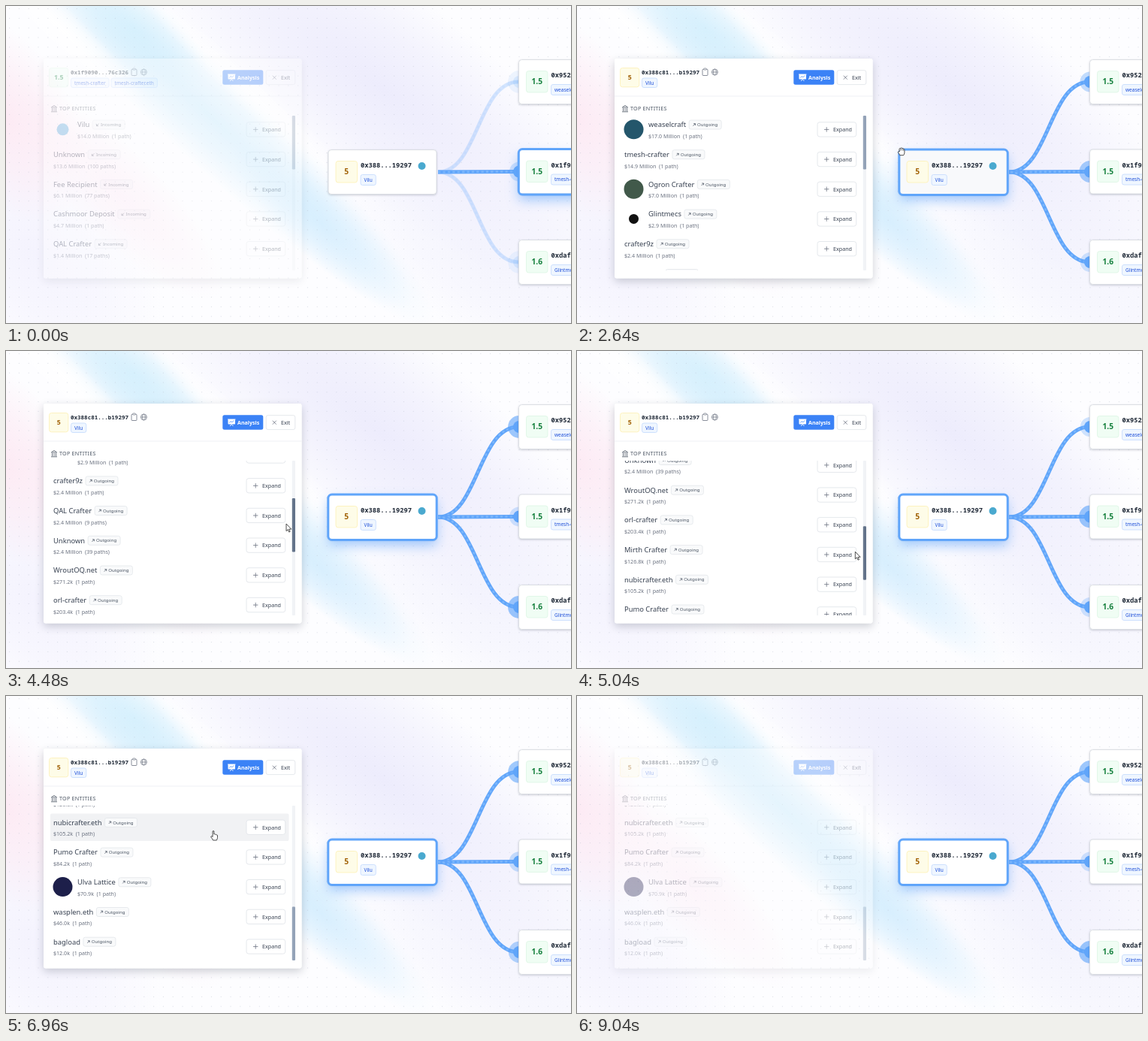
An HTML page with a canvas for the animation above (9120 ms loop, 752 by 422 pixels).

```html
<!DOCTYPE html>
<html lang="en">
<head>
<meta charset="utf-8">
<title>Entity paths</title>
<style>
html, body { margin: 0; width: 100%; height: 100%; overflow: hidden; background: #fff; }
canvas { display: block; width: 752px; height: 422px; }
</style>
</head>
<body>
<canvas id="stage"></canvas>
<script>
const W = 752, H = 422, LOOP = 9120;
const SANS = '"Noto Sans", "Open Sans", sans-serif';
const MONO = '"Noto Sans Mono", "DejaVu Sans Mono", monospace';
const BLUE = '#60a5fa';
const SELECT = 1400, ROWS_IN = 1475, STAGGER = 100, ROW_TIME = 300;
const DRAG_FROM = 3760, DRAG_TO = 5800;
const PITCH = 39.7, LIST_TOP = 146, LIST_H = 206, MAX_SCROLL = 386.6, THUMB = 71.5;

const dpr = window.devicePixelRatio || 1;
const clamp = (v, a = 0, b = 1) => Math.min(b, Math.max(a, v));
const mix = (a, b, p) => a + (b - a) * p;

function layer(el = document.createElement('canvas')) {
  el.width = W * dpr;
  el.height = H * dpr;
  const c = el.getContext('2d');
  c.scale(dpr, dpr);
  return c;
}
const screen = layer(document.getElementById('stage'));
const backdrop = layer(), panel = layer();
let g = screen;

// ---- drawing helpers ----
function text(s, x, cy, size, color, weight = 400, font = SANS) {
  g.font = `${weight} ${size}px ${font}`;
  g.fillStyle = color;
  g.fillText(s, x, cy + size * 0.36);
  return g.measureText(s).width;
}
function centred(s, x, cy, size, color, weight) {
  g.textAlign = 'center';
  text(s, x, cy, size, color, weight);
  g.textAlign = 'left';
}
function box(x, y, w, h, r, fill, stroke, line = 0.8) {
  g.beginPath();
  g.roundRect(x, y, w, h, r);
  if (fill) { g.fillStyle = fill; g.fill(); }
  if (stroke) { g.strokeStyle = stroke; g.lineWidth = line; g.stroke(); }
}
function shadowBox(x, y, w, h, r, color, blur, dy) {
  g.save();
  g.shadowColor = color;
  g.shadowBlur = blur * dpr;
  g.shadowOffsetY = dy * dpr;
  box(x, y, w, h, r, '#fff');
  g.restore();
}
function disc(x, y, r, color) {
  g.beginPath();
  g.arc(x, y, r, 0, Math.PI * 2);
  g.fillStyle = color;
  g.fill();
}
function lines(d, color, width = 0.8) {
  g.strokeStyle = color;
  g.lineWidth = width;
  g.stroke(new Path2D(d));
}
function blueTag(s, x, y, h = 12.5) {
  g.font = `500 6.5px ${SANS}`;
  const w = g.measureText(s).width + 9;
  box(x, y, w, h, 2.5, '#eff6ff', '#c3dafe');
  text(s, x + 4.5, y + h / 2, 6.5, '#1d4ed8', 500);
  return w;
}
function score(s, x, y, size, fontSize) {
  const amber = s === '5';
  box(x, y, size, size, 3, amber ? '#fefce8' : '#f0fdf4', amber ? '#fdf0b4' : '#dcf5e4');
  centred(s, x + size / 2, y + size / 2, fontSize, amber ? '#a16207' : '#15803d', 600);
}

// ---- backdrop ----
function glow(x, y, deg, len, wide, rgb, a) {
  g.save();
  g.translate(x, y);
  g.rotate(deg * Math.PI / 180);
  g.scale(len, wide);
  const f = g.createRadialGradient(0, 0, 0, 0, 0, 1);
  f.addColorStop(0, `rgba(${rgb},${a})`);
  f.addColorStop(0.5, `rgba(${rgb},${a * 0.6})`);
  f.addColorStop(1, `rgba(${rgb},0)`);
  g.fillStyle = f;
  g.fillRect(-1, -1, 2, 2);
  g.restore();
}
function paintBackdrop() {
  g = backdrop;
  g.fillStyle = '#fdfdff';
  g.fillRect(0, 0, W, H);
  glow(500, 110, 38, 430, 130, '224,222,250', 0.55);
  glow(640, 340, 35, 260, 100, '236,236,252', 0.5);
  glow(40, 330, 45, 200, 130, '238,236,253', 0.6);
  glow(0, 150, 60, 150, 90, '252,224,238', 0.65);
  glow(150, 250, 45, 190, 60, '250,228,242', 0.5);
  glow(275, 150, 43, 400, 62, '190,230,252', 0.6);
  glow(170, 30, 38, 120, 50, '200,236,252', 0.5);
  glow(420, 290, 43, 160, 45, '195,230,254', 0.4);
  glow(75, 30, 43, 150, 26, '255,255,255', 0.9);
  glow(330, 120, 43, 210, 22, '255,255,255', 0.7);
  g.fillStyle = 'rgba(190,196,212,.55)';
  for (let y = 3.6; y < H; y += 12.8)
    for (let x = 4.6; x < W; x += 12.8) g.fillRect(x - 0.5, y - 0.5, 1, 1);
}

// ---- graph ----
const targets = [
  { y: 101, score: '1.5', hash: '0x952...', tag: 'weaselcraft', phase: 0 },
  { y: 220.5, score: '1.5', hash: '0x1f9...', tag: 'tmesh-crafter', phase: 0.53 },
  { y: 341, score: '1.6', hash: '0xdaf...', tag: 'Glintmecs', phase: 0.12 }
];

function edge(y, t, strength) {
  const path = new Path2D(`M575 221C628 221 628 ${y} 682 ${y}`);
  g.save();
  g.globalAlpha = strength;
  g.strokeStyle = BLUE;
  g.lineWidth = 5;
  g.stroke(path);
  g.setLineDash([3.2, 3.2]);
  g.lineDashOffset = -(t % 500) / 500 * 6.4;
  g.strokeStyle = 'rgba(147,197,253,.55)';
  g.lineWidth = 2.6;
  g.stroke(path);
  g.restore();
}
function handle(node, t, strength) {
  const wave = Math.cos((t / 1140 + node.phase) * Math.PI * 2);
  g.save();
  g.globalAlpha = strength * (0.45 + 0.18 * wave);
  disc(683, node.y, 14 + wave, BLUE);
  g.globalAlpha = strength;
  disc(683, node.y, 8, BLUE);
  g.restore();
}
function card(x, cy, w, selected, hover) {
  const y = cy - 29.5;
  shadowBox(x, y, w, 59, 4, 'rgba(30,41,59,.28)', 3, 1);
  if (selected > 0) {
    g.save();
    g.globalAlpha = selected;
    shadowBox(x, y, w, 59, 4, 'rgba(96,165,250,.6)', 16, 8);
    g.restore();
  }
  box(x, y, w, 59, 4, hover ? '#f8f9fb' : '#fff', '#d5d8df');
  if (selected > 0) {
    g.save();
    g.globalAlpha = selected;
    box(x - 0.2, y - 0.4, w + 0.4, 60.3, 5, null, BLUE, 3);
    g.restore();
  }
}
function nodeBody(x, cy, n) {
  score(n.score, x + 10, cy - 14.5, 28.5, 10.2);
  text(n.hash, x + 43, cy - 9, 8.72, '#1f2937', 600, MONO);
  blueTag(n.tag, x + 43, cy + 3.5, 14);
}
function paintGraph(t, cur) {
  const on = clamp((t - SELECT) / 150);
  targets.forEach((n, i) => {
    const strength = i === 1 ? 1 : mix(0.25, 1, on);
    edge(n.y, t, strength);
    handle(n, t, i === 1 ? 1 : mix(0.16, 1, on));
  });
  targets.forEach((n, i) => {
    card(682.5, n.y, 150, i === 1 ? 1 - on : 0, false);
    nodeBody(682.5, n.y, n);
  });
  const hover = cur.shown && cur.x > 429 && cur.x < 573 && Math.abs(cur.y - 221) < 30;
  card(429, 221, 144, on, hover);
  nodeBody(429, 221, { score: '5', hash: '0x388...19297', tag: 'Vilu' });
  disc(553.5, 213, 5, '#4aa9cf');
}

// ---- side panel ----
const incoming = [
  ['Vilu', '$14.0 Million  (1 path)', '#5ab4e0', 8],
  ['Unknown', '$13.6 Million  (100 paths)'],
  ['Fee Recipient', '$6.1 Million  (77 paths)'],
  ['Cashmoor Deposit', '$4.7 Million  (1 path)'],
  ['QAL Crafter', '$1.4 Million  (17 paths)']
];
const outgoing = [
  ['weaselcraft', '$17.0 Million  (1 path)', '#24566b', 13],
  ['tmesh-crafter', '$14.9 Million  (1 path)'],
  ['Ogron Crafter', '$7.0 Million  (1 path)', '#41594a', 13],
  ['Glintmecs', '$2.9 Million  (1 path)', '#111111', 6.5],
  ['crafter9z', '$2.4 Million  (1 path)'],
  ['QAL Crafter', '$2.4 Million  (9 paths)'],
  ['Unknown', '$2.4 Million  (39 paths)'],
  ['WroutOQ.net', '$271.2k  (1 path)'],
  ['orl-crafter', '$203.4k  (1 path)'],
  ['Mirth Crafter', '$126.8k  (1 path)'],
  ['nubicrafter.eth', '$105.2k  (1 path)'],
  ['Pumo Crafter', '$84.2k  (1 path)'],
  ['Ulva Lattice', '$70.9k  (1 path)', '#1d1f4a', 13],
  ['wasplen.eth', '$46.0k  (1 path)'],
  ['bagload', '$12.0k  (1 path)']
];

function row([name, sum, color, r], y, out, hover) {
  if (hover) box(59, y + 11 - 11, 317.5, 36.5, 2, '#f1f2f4');
  const x = color ? 95 : 63;
  if (color) disc(75.5, y + 18.3, r, color);
  const tx = x + text(name, x, y + 12, 9.4, '#374151', 500) + 4;
  box(tx, y + 6, 43, 12, 2.5, '#f9fafb', '#e3e6ea');
  const d = out ? 'l3 -3m-2.4 0h2.4v2.4' : 'm3 -3l-3 3m0 -2.4v2.4h2.4';
  lines(`M${tx + 5.3} ${y + 13.6}${d}`, '#4b5563', 0.75);
  text(out ? 'Outgoing' : 'Incoming', tx + 10.8, y + 12, 6.1, '#4b5563', 500);
  text(sum, x, y + 27.4, 7.1, '#6b7280');
  box(320, y + 8.7, 51.7, 19.3, 3, '#fff', '#dfe2e7');
  lines(`M329 ${y + 18.4}h6.4m-3.2 -3.2v6.4`, '#6b7280', 0.8);
  text('Expand', 341, y + 18.6, 7.15, '#374151', 500);
}
function header(out) {
  shadowBox(50, 70, 343.5, 292.5, 3, 'rgba(30,41,59,.22)', 12, 4);
  box(50, 70, 343.5, 292.5, 3, '#fff');
  score(out ? '5' : '1.5', 57.5, 82.5, 25.3, 8.7);
  text(out ? '0x388c81...b19297' : '0x1f9090...76c326', 86, 87.8, 7.55, '#1f2937', 600, MONO);
  if (out) blueTag('Vilu', 86.5, 96);
  else blueTag('tmesh-crafter.eth', 86.5 + 3 + blueTag('tmesh-crafter', 86.5, 96), 96);

  box(167, 84.2, 7, 8.3, 1, null, '#6b7280', 0.8);
  box(168.8, 83, 3.4, 2, 0.6, '#fff', '#6b7280', 0.7);
  lines('M179.4 88a4 4 0 1 0 8 0a4 4 0 1 0 -8 0h8M181.5 88a1.9 4 0 1 0 3.8 0a1.9 4 0 1 0 -3.8 0', '#6b7280', 0.7);

  box(288.3, 85.3, 54, 19.5, 2.5, '#3b82f6');
  box(295.5, 91, 9.5, 6.5, 0.8, '#fff');
  lines('M295 91h10.5M298 100l2.2 -2.4l2.2 2.4', '#fff', 0.9);
  lines('M297.2 95.6l2 -2l1.6 1.3l2.4 -2.4', '#3b82f6', 0.8);
  text('Analysis', 308, 95.4, 7.1, '#fff', 600);
  box(346.2, 85.6, 38.6, 19, 2.5, '#fff', '#dfe2e7');
  lines('M354.8 92.7l5 5m0 -5l-5 5', '#6b7280', 0.8);
  text('Exit', 366, 95.4, 7.15, '#374151', 500);

  lines('M50 120h343.5', '#eef0f4', 0.9);
  lines('M60.3 135l3.7 -2.6l3.7 2.6zM60 140.8h8M61.5 136v4M64 136v4M66.5 136v4', '#4b5563', 0.8);
  g.letterSpacing = '0.25px';
  text('TOP ENTITIES', 71, 136.7, 7.15, '#4b5563', 500);
  g.letterSpacing = '0px';
}
function paintPanel(t, cur, scroll) {
  g = panel;
  g.clearRect(0, 0, W, H);
  const out = t >= SELECT + 30;
  header(out);
  g.save();
  g.beginPath();
  g.rect(58, LIST_TOP, 335, LIST_H);
  g.clip();
  (out ? outgoing : incoming).forEach((item, i) => {
    const y = LIST_TOP + i * PITCH - scroll;
    if (y > 352 || y < 105) return;
    const p = out ? clamp((t - ROWS_IN - i * STAGGER) / ROW_TIME) : 1;
    const e = 1 - (1 - p) ** 3, s = 0.5 + 0.5 * e;
    g.save();
    g.globalAlpha = e;
    g.translate(2, y + 12);
    g.scale(s, s);
    g.translate(-2, -y - 12);
    row(item, y, out, i === cur.row);
    g.restore();
  });
  box(380.8, LIST_TOP, 4.2, LIST_H, 1, '#f1f3f6');
  const dark = cur.drag || (cur.shown && cur.x > 379 && cur.x < 387);
  const ty = LIST_TOP + scroll / MAX_SCROLL * (LIST_H - THUMB);
  box(380.8, ty, 4.2, THUMB, 1.2, dark ? '#64748b' : '#94a3b8');
  g.restore();

  g = screen;
  g.globalAlpha = Math.min(clamp(0.35 + t / 600), clamp(1 - (t - 8640) / 615));
  g.drawImage(panel.canvas, 0, 0, W, H);
  g.globalAlpha = 1;
}

// ---- cursor ----
const stops = [
  [240, 745, 228], [1100, 540, 227], [1400, 536, 226], [1900, 536, 226],
  [3100, 381, 178], [3760, 381, 180], [4480, 373, 230], [5520, 368, 299],
  [5800, 368, 315], [6050, 366, 308], [6750, 276, 180], [7300, 276, 180], [8300, 238, 50]
];
function cursorAt(t, scroll) {
  const k = clamp(stops.findIndex(s => s[0] > t), 1, stops.length - 1);
  const a = stops[k - 1], b = stops[k];
  const drag = t >= DRAG_FROM && t < DRAG_TO;
  let p = clamp((t - a[0]) / (b[0] - a[0]));
  if (!drag) p = p * p * (3 - 2 * p);
  const cur = { x: mix(a[1], b[1], p), y: mix(a[2], b[2], p), drag, row: -1 };
  cur.shown = t >= 240 && t < 8320;
  const inList = cur.x > 59 && cur.x < 376 && cur.y > LIST_TOP && cur.y < LIST_TOP + LIST_H;
  if (cur.shown && !drag && inList) cur.row = Math.floor((cur.y - LIST_TOP + scroll) / PITCH);
  return cur;
}
const ARROW = new Path2D('M0 0V9.6L2.2 7.6L3.7 11L5.2 10.3L3.7 7.1H6.8Z');
const POINTER = new Path2D('M-.9 0Q0 -1.2 .9 0V4Q1.8 3.2 2.6 4.3Q3.6 3.8 4.2 4.9Q5.4 4.6 5.5 5.9V8.4Q5.3 10.5 4.3 12H-.4Q-1.4 9.8 -3.3 7.7Q-3.2 6 -1.6 6.9L-.9 7.5Z');
const GRAB = new Path2D('M-2.7 -3.4Q-2 -5 -1 -4L-.9 -4.4Q.2 -5.6 1 -4.2Q2.2 -5 2.7 -3.4Q4.1 -3.6 4.2 -2V1.5Q4 3.6 3 5H-1.9Q-2.7 3.2 -4.4 1Q-4.2 -.7 -2.5 .3Z');
function paintCursor(cur) {
  if (!cur.shown) return;
  const shape = cur.row >= 0 ? POINTER : cur.x > 394 ? GRAB : ARROW;
  g.save();
  g.translate(cur.x, cur.y);
  g.lineJoin = 'round';
  g.fillStyle = '#fff';
  g.fill(shape);
  g.strokeStyle = '#222';
  g.lineWidth = 0.8;
  g.stroke(shape);
  if (shape === GRAB) lines('M-1 -3.8v2.6M1 -4v2.7M2.7 -3.2v2.2', '#222', 0.6);
  g.restore();
}

// ---- loop ----
function scrollAt(t) {
  if (t < DRAG_FROM) return 0;
  if (t >= DRAG_TO) return MAX_SCROLL;
  return clamp((cursorAt(t, 0).y - 180) * MAX_SCROLL / (LIST_H - THUMB), 0, MAX_SCROLL);
}
function frame(now) {
  const t = now % LOOP;
  const scroll = scrollAt(t), cur = cursorAt(t, scroll);
  g = screen;
  g.drawImage(backdrop.canvas, 0, 0, W, H);
  paintGraph(t, cur);
  paintPanel(t, cur, scroll);
  paintCursor(cur);
}
paintBackdrop();
const begin = performance.now();
function tick() {
  frame(performance.now() - begin);
  requestAnimationFrame(tick);
}
tick();
</script>
</body>
</html>
```
